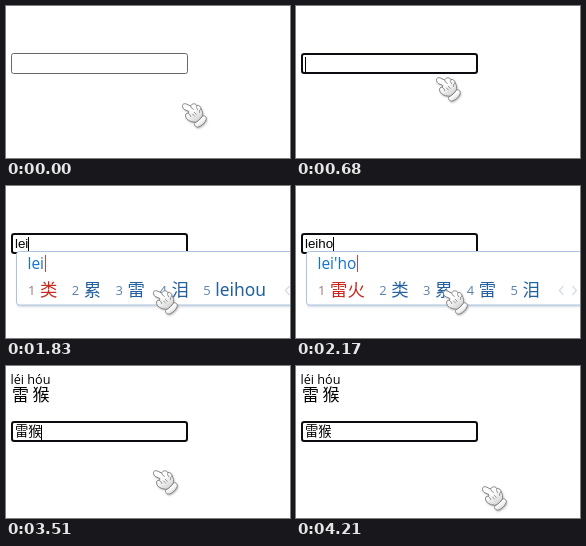
Write an HTML page that moves like this. It is 284x152 px and loops after 4240 ms.

```html
<!DOCTYPE html>
<html lang="zh">
<head>
<meta charset="utf-8">
<title>Pinyin input</title>
<style>
  html, body { margin: 0; width: 100%; height: 100%; overflow: hidden; background: #fff; }
  svg { display: block; width: 100vw; height: 100vh; }
  text { white-space: pre; }
  .field { font: 13.333px "Liberation Sans", Arial, "Noto Sans CJK SC", "Noto Sans CJK", sans-serif; }
  .pinyin { font: 12.7px "Open Sans", "Noto Sans", sans-serif; }
  .hanzi { font: 17px "Noto Sans CJK SC", "Noto Sans CJK", sans-serif; }
  .typed { font: 15.5px "Open Sans", "Noto Sans", sans-serif; fill: #1272d2; }
  .num { font: 13px "Open Sans", "Noto Sans", sans-serif; fill: #5b82ad; }
  .word { font: 500 17.4px "Noto Sans", "Noto Sans CJK SC", "Noto Sans CJK", sans-serif; fill: #24609f; }
  .first .num { fill: #9a7474; }
  .first .word { fill: #c9281c; font-weight: 400; }
  .caret { shape-rendering: crispEdges; }
</style>
</head>
<body>
<svg viewBox="0 0 284 152" preserveAspectRatio="none">
  <defs>
    <linearGradient id="glove" x1="0" y1="0" x2="0.8" y2="1">
      <stop offset="0.45" stop-color="#fff"/>
      <stop offset="1" stop-color="#cfcfcf"/>
    </linearGradient>
    <filter id="soft" x="-30%" y="-30%" width="160%" height="160%">
      <feGaussianBlur stdDeviation="1"/>
    </filter>
  </defs>

  <g id="result">
    <text class="pinyin" x="4.5" y="18">léi hóu</text>
    <text class="hanzi" x="6" y="35">雷</text>
    <text class="hanzi" x="26.5" y="35">猴</text>
  </g>

  <g id="input">
    <rect id="frame" fill="#fff"/>
    <text id="value" class="field" x="9" y="15"></text>
    <rect id="caret" class="caret" y="4" width="1" height="15"/>
  </g>

  <g id="popup">
    <rect x="11" y="68" width="300" height="53" rx="3" fill="#8fa3bb" opacity=".4" filter="url(#soft)"/>
    <rect x="10.5" y="65.5" width="300" height="53.5" rx="3" fill="#fff" stroke="#adc3de"/>
    <text id="typed" class="typed" x="21.5" y="83"></text>
    <rect id="bar" class="caret" y="69" width="1" height="17" fill="#d8402c"/>
    <g id="words"></g>
  </g>

  <g id="hand">
    <g id="shape">
      <path d="M1.6 4.8C.8 2 3.6 1 5.8 2.2L9.6 4.1C10.6 1.4 14.2 1 15.8 3.4
        C18.2 3 20 4.8 20 7C21.8 9 22 12 21.2 14.6L15.6 20.2
        C11 20.4 5.6 18.6 4.7 14.8C4 12 5.6 10.8 7.4 11.4L8 9.6L3.2 7.4C2.3 6.8 1.8 6 1.6 4.8Z"/>
      <path d="M14 20.8C16.8 19.6 20 16.8 21.2 14.2C23.4 12.8 26 15 25.2 17.6
        C24 21 20.6 24 17.4 25C14.4 25.6 12.6 22.8 14 20.8Z"/>
    </g>
    <path d="M9.6 4.1Q9.8 6.6 12.4 7.4M15.8 3.4Q14.6 5.6 16.6 7.8M20 7Q17.8 8 18.4 10.4
      M7.4 11.4Q9.6 12.4 9.8 14.6M13.4 10.4L15.2 12.4M11.6 12L13.4 14"
      fill="none" stroke="#8a8a8a" stroke-width=".9" stroke-linecap="round"/>
  </g>
</svg>
<script>
const LOOP = 4240;
const $ = id => document.getElementById(id);
const SVG = "http://www.w3.org/2000/svg";

// [time, letters, preedit text, candidates]
const typing = [
  [1510, "l", "l", "了 来 老 里 两个"],
  [1730, "le", "le", "了 乐 勒 肋 乐了"],
  [1830, "lei", "lei", "类 累 雷 泪 leihou"],
  [2010, "leih", "lei'h", "雷火 类 累 雷 泪"],
  [2170, "leiho", "lei'ho", "雷火 类 累 雷 泪"],
  [2230, "leihou", "lei'hou", "雷猴 类 累 雷 泪"]
];
const COMMIT = 2480, FOCUS = 460, HOVER = 240;

// [first step, last step, number of steps, from, to, easing power]
const moves = [
  [30, 300, 10, [175, 96], [138, 64], 1.5],
  [680, 1000, 11, [138, 64], [146, 103], 1.6],
  [4020, 4210, 7, [146, 103], [185, 119], 1.2]
];

// [time, caret visible]
const blinks = [[0, 0], [FOCUS, 1], [1000, 0], [1510, 1], [3010, 0], [3510, 1], [4020, 0]];

const latest = (list, t) => list.filter(row => row[0] <= t).pop();
const show = (id, on) => $(id).setAttribute("visibility", on ? "visible" : "hidden");

function set(el, attrs) {
  for (const key in attrs) el.setAttribute(key, attrs[key]);
}

function label(parent, cls, x, y, str) {
  const el = document.createElementNS(SVG, "text");
  set(el, { class: cls, x, y });
  el.textContent = str;
  parent.appendChild(el);
  return el.getComputedTextLength();
}

function handAt(t) {
  const move = latest(moves, t);
  if (!move) return moves[0][3];
  const [start, end, count, from, to, power] = move;
  const step = Math.floor((t - start) / (end - start) * (count - 1) + 1.001);
  const p = 1 - Math.pow(1 - Math.min(step / count, 1), power);
  return from.map((v, i) => Math.round(v + (to[i] - v) * p));
}

function drawFrame(focused, hover) {
  const w = focused ? 2 : 1;
  set($("frame"), {
    x: 5 + w / 2, y: w / 2, width: 177 - w, height: 21 - w, rx: 2.2,
    "stroke-width": w, stroke: focused ? "#0b0b10" : hover ? "#4a4a4a" : "#686868"
  });
}

function drawWords(list) {
  const box = $("words");
  box.replaceChildren();
  let x = 22;
  list.split(" ").forEach((word, i) => {
    const item = document.createElementNS(SVG, "g");
    if (!i) item.setAttribute("class", "first");
    box.appendChild(item);
    label(item, "num", x, 109, i + 1);
    x += 12 + label(item, "word", x + 12, 110, word) + 14.4;
  });
  const arrows = document.createElementNS(SVG, "path");
  set(arrows, {
    d: `M${x + 9} 100l-4 4.5l4 4.5m9 -9l4 4.5l-4 4.5`,
    fill: "none", stroke: "#d5dbe2", "stroke-width": 1.2
  });
  box.appendChild(arrows);
}

let last = null;
function drawText(t) {
  const done = t >= COMMIT;
  const row = done ? null : latest(typing, t);
  const value = done ? "雷猴" : row ? row[1] : "";
  show("result", done);
  show("popup", row);
  $("input").setAttribute("transform", `translate(0 ${done ? 55 : 47})`);
  if (value === last) return;
  last = value;
  $("value").textContent = value;
  const width = value ? $("value").getComputedTextLength() : 0;
  $("caret").setAttribute("x", Math.floor(9 + width));
  if (row) {
    $("typed").textContent = row[2];
    $("bar").setAttribute("x", Math.round(22 + $("typed").getComputedTextLength()));
    drawWords(row[3]);
  }
}

function render(now) {
  const t = now % LOOP;
  drawFrame(t >= FOCUS, t >= HOVER);
  drawText(t);
  show("caret", latest(blinks, t)[1]);
  $("hand").setAttribute("transform", `translate(${handAt(t)})`);
}

const shadow = $("shape").cloneNode(true);
shadow.removeAttribute("id");
set(shadow, { fill: "#666", opacity: 0.55, filter: "url(#soft)", transform: "translate(.8 1.2)" });
$("hand").prepend(shadow);
set($("shape"), { fill: "url(#glove)", stroke: "#858585", "stroke-width": 1 });

const begin = performance.now();
function tick() {
  render(performance.now() - begin);
  requestAnimationFrame(tick);
}
tick();
</script>
</body>
</html>
```
